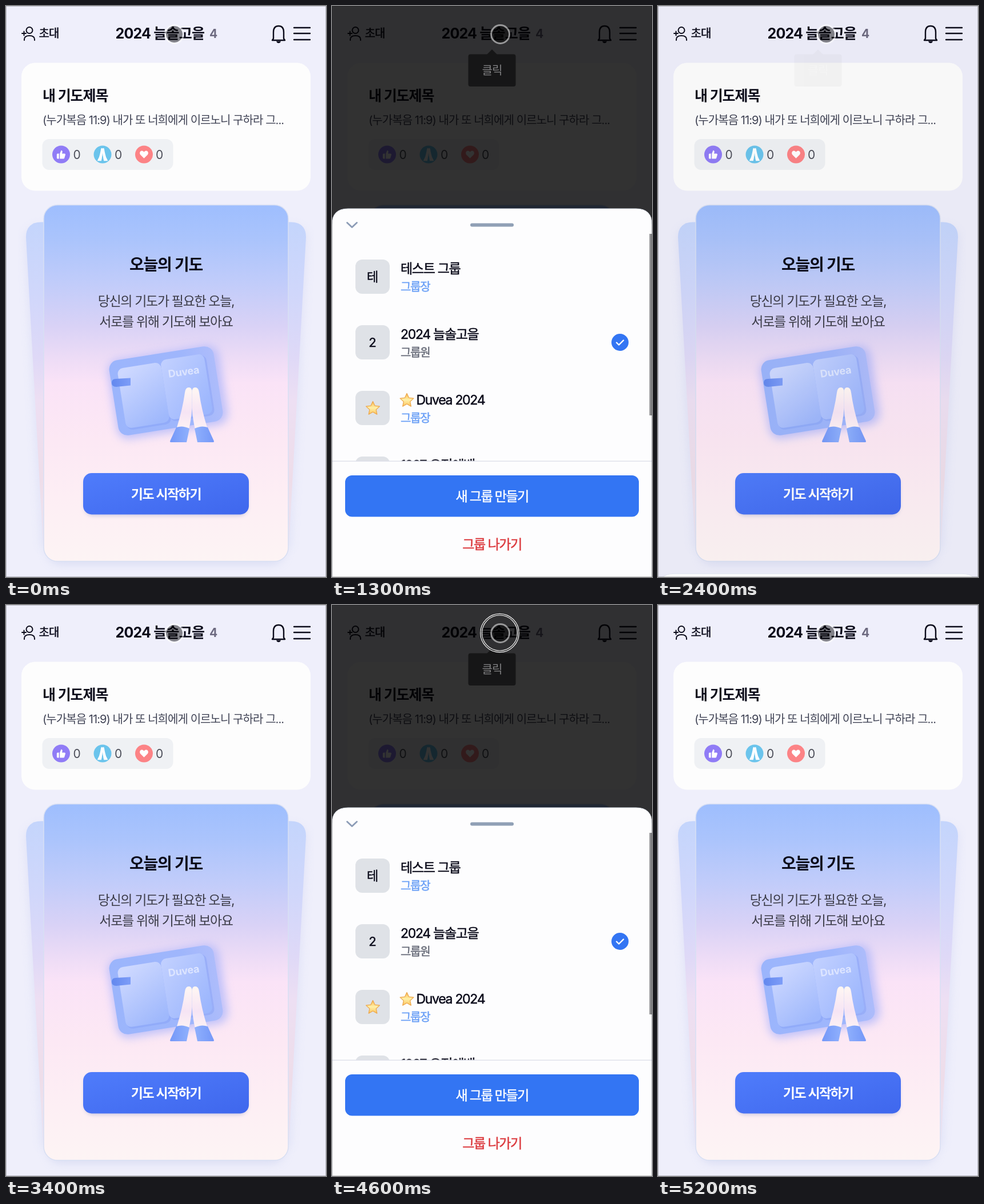
Recreate the animation shown at these times as an HTML page. Size 560 px wide and 1000 px high, loop 5.5 s.

```html
<!DOCTYPE html>
<html lang="ko">
<head>
<meta charset="utf-8">
<title>기도 그룹</title>
<style>
html, body { margin: 0; width: 100%; height: 100%; overflow: hidden; background: #efeffb; }
svg { display: block; width: 100vw; height: 100vh; }
text { font-family: Inter, 'Noto Sans CJK KR', 'Noto Sans CJK', sans-serif; white-space: pre; }
</style>
</head>
<body>
<svg id="stage" viewBox="0 0 560 1000" xmlns="http://www.w3.org/2000/svg"></svg>
<script>
const LOOP = 5500, STEP = 100;
const OPEN_Y = 355, TRAVEL = 645, SLIDE = 500;
const SHEETS = [[669, 2033], [3414, 4633]]; // opening and closing starts
const TAPS = [500, 2000, 3200, 4600];
const GROUP = '2024 늘솔고을', APP = 'Duvea';
const INK = '#0b0b1a', BLUE = '#3375f3';

// ---- drawing helpers ----
// Medium weight is regular with a hairline outline, so Hangul thickens too.
function text(x, y, size, weight, fill, gap, str, anchor = 'start', extra = '') {
  const face = weight === 500
    ? `font-weight="400" stroke="${fill}" stroke-width="${size * .022}"`
    : `font-weight="${weight}"`;
  return `<text x="${x}" y="${y}" font-size="${size}" ${face} fill="${fill}" letter-spacing="${gap}" text-anchor="${anchor}" ${extra}>${str}</text>`;
}
const rect = (x, y, w, h, r, fill, extra = '') =>
  `<rect x="${x}" y="${y}" width="${w}" height="${h}" rx="${r}" fill="${fill}" ${extra}/>`;
const disc = (x, y, r, fill, extra = '') =>
  `<circle cx="${x}" cy="${y}" r="${r}" fill="${fill}" ${extra}/>`;
const line = (d, color, width) =>
  `<path d="${d}" fill="none" stroke="${color}" stroke-width="${width}" stroke-linecap="round" stroke-linejoin="round"/>`;
const gradient = (id, stops, dir = 'x1="0" y1="0" x2="0" y2="1"') =>
  `<linearGradient id="${id}" ${dir}>${stops.map(([o, c]) => `<stop offset="${o}" stop-color="${c}"/>`).join('')}</linearGradient>`;
const blur = (id, size) =>
  `<filter id="${id}" x="-30%" y="-30%" width="160%" height="160%"><feGaussianBlur stdDeviation="${size}"/></filter>`;

function star(x, y, r) {
  const pts = Array.from({ length: 10 }, (_, i) => {
    const a = i * Math.PI / 5 - Math.PI / 2, k = i % 2 ? r * 0.48 : r;
    return (x + k * Math.cos(a)).toFixed(1) + ',' + (y + k * Math.sin(a)).toFixed(1);
  });
  return `<polygon points="${pts.join(' ')}" fill="url(#gold)" stroke="#eda84e" stroke-width="1.3" stroke-linejoin="round"/>`;
}

function hands(skin, cuff) {
  const half = `<path d="M313 677Q314 668 320 668Q325.500 668 325.500 676V704Q324 726 320 741L299 738Q309 706 313 677Z" fill="${skin}"/>
    <path d="M298 738Q309 734 321 740L316 764H289Q286 764 287.5 761Z" fill="${cuff}"/>`;
  return half + `<g transform="translate(651 0) scale(-1 1)">${half}</g>`;
}

const defs = `<defs>
  ${gradient('card', [[0, '#9ebefe'], [.1, '#abc4fc'], [.22, '#c1ccfa'], [.34, '#d9d2f6'], [.43, '#eddcf6'], [.5, '#fae3f7'], [.66, '#fce8f4'], [.82, '#fdeef4'], [1, '#fdf4f4']])}
  ${gradient('wing', [[0, '#c4d5fc'], [.22, '#d0d7fb'], [.42, '#dfd9f7'], [.55, '#eddff3'], [.8, '#eedde9'], [1, '#ebe5f4']])}
  ${gradient('button', [[0, '#4f7cfb'], [1, '#3f67ed']], 'x1="0" y1="0" x2="1" y2="1"')}
  ${gradient('cover', [[0, '#9bb5fc'], [.7, '#9fb6fc'], [1, '#adbcfb']], 'x1="0" y1="0" x2="1" y2="0"')}
  ${gradient('pageL', [[0, '#cdd8ff'], [1, '#9fb8fc']], 'x1=".3" y1="0" x2=".7" y2="1"')}
  ${gradient('pageR', [[0, '#c3d1ff'], [1, '#9cb6fd']], 'x1="0" y1="0" x2=".8" y2="1"')}
  ${gradient('tab', [[0, '#6388ee'], [1, '#7d9df8']], 'x1="0" y1="0" x2="1" y2="0"')}
  ${gradient('skin', [[0, '#fff7f3'], [.6, '#f6e4f4'], [1, '#fdf2f4']])}
  ${gradient('cuff', [[0, '#7598f8'], [1, '#8fb0fd']], 'x1="0" y1="0" x2="1" y2="0"')}
  ${gradient('gold', [[0, '#f9b94e'], [.5, '#fff0a8'], [1, '#fbc45c']])}
  ${blur('soft', 8)}${blur('tight', 3)}
  <clipPath id="list"><rect x="0" y="44" width="560" height="398"/></clipPath>
</defs>`;

// ---- page ----
function header() {
  return line('M28 48H35M31.500 44.500V51.500M32 60V58.500Q32 52 41 52Q50 52 50 58.500V60', INK, 2)
    + disc(41, 42.500, 5.500, 'none', `stroke="${INK}" stroke-width="2"`)
    + text(57.500, 55, 20, 500, INK, -.8, '초대')
    + text(191.500, 57, 25, 700, INK, -.8, GROUP)
    + text(356, 56, 21, 700, '#6d6a80', 0, '4')
    + line('M468 57V46Q468 35 477 35Q486 35 486 46V57L488 60H466Z', INK, 2.4)
    + `<path d="M473 61.500H481Q480 65 477 65T473 61.500Z" fill="${INK}"/>`
    + line('M504 38H532M504 48H532M504 59H532', INK, 2.4);
}

function reactions() {
  const thumb = 'M9 10L12 2.5Q15 2.500 15 5.880L14 10H19.830Q22.300 10.300 21.750 12.560L19.420 20.560Q18.900 22 17.500 22H9ZM2 12Q2 10 4 10H7V22H4Q2 22 2 20Z';
  const heart = 'M12 21L4 13C1 10 2 4 7 3.500C9.500 3.500 11 5 12 6.300C13 5 14.500 3.500 17 3.500C22 4 23 10 20 13Z';
  const icon = (x, d) => `<path d="${d}" fill="#fff" transform="translate(${x} 260) scale(.76) translate(-12 -12)"/>`;
  const zero = x => text(x, 267.500, 21, 400, '#4d4f5a', 0, '0');
  return rect(63.500, 233, 229, 54, 12, '#eff1f4')
    + disc(96.500, 260, 15.500, '#907cf6') + icon(96.500, thumb) + zero(117.500)
    + disc(169, 260, 15.500, '#6bc4ec')
    + `<g transform="translate(169 260) scale(.235) translate(-325.500 -716)">${hands('#fff', '#fff')}</g>` + zero(190)
    + disc(241.500, 260, 15.500, '#fc8386') + icon(241.500, heart) + zero(262);
}

function book() {
  return `<g transform="translate(280 674) rotate(-9)">
    ${rect(-95, -67, 196, 140, 20, '#a9b4fb', 'opacity=".75" filter="url(#soft)"')}
    ${rect(-92.500, -66.500, 185, 133, 16, 'url(#cover)')}</g>
    <g transform="translate(242 684) rotate(-9)">${rect(-38, -53, 78, 107, 10, '#7f9cf3', 'opacity=".4"')}</g>
    <g transform="translate(240 682) rotate(-9)">${rect(-38, -53, 77, 106, 10, 'url(#pageL)')}</g>
    <g transform="translate(318 669) rotate(-9)">${rect(-38, -53, 78, 107, 10, '#7f9cf3', 'opacity=".4"')}</g>
    <g transform="translate(316 667) rotate(-9)">${rect(-38.500, -53, 77, 106, 10, 'url(#pageR)')}</g>
    <path d="M192 653L218 651.500V664.500L193 667Q185 667 185 660T192 653Z" fill="url(#tab)"/>`
    + text(311, 647, 18, 700, '#dde5ff', -.3, APP, 'middle', 'transform="rotate(-8 311 641)"')
    + hands('url(#skin)', 'url(#cuff)');
}

function page() {
  const wing = '<path d="M70 378.500H61Q35 379 35 405L65 945H70Z" fill="url(#wing)"/>';
  const wingGlow = '<path d="M70 384H61Q33 386 33 410L62 950H70Z" fill="#cfd3f3" opacity=".45" filter="url(#soft)"/>';
  const side = wingGlow + wing;
  return rect(0, 0, 560, 1000, 0, '#efeffb') + header()
    + rect(27, 99.500, 506, 224, 24, '#fdfdfd')
    + text(64, 166, 25, 700, INK, -1.1, '내 기도제목')
    + text(64, 206.500, 20, 400, '#3f4254', -.95, '(누가복음 11:9) 내가 또 너희에게 이르노니 구하라 그...')
    + reactions()
    + side + `<g transform="translate(560 0) scale(-1 1)">${side}</g>`
    + rect(72, 880, 416, 98, 24, '#c5cbec', 'opacity=".5" filter="url(#soft)"')
    + rect(66, 348.500, 428, 624, 24, 'url(#card)', 'stroke="#d8dff3" stroke-width="1.5"')
    + text(280, 463, 28, 700, INK, -1.2, '오늘의 기도', 'middle')
    + text(280, 524.500, 23, 400, '#3c3c48', -1.35, '당신의 기도가 필요한 오늘,', 'middle')
    + text(280, 561, 23, 400, '#3c3c48', -1.35, '서로를 위해 기도해 보아요', 'middle')
    + book()
    + rect(137, 823, 286, 70, 15, '#8c95c8', 'opacity=".4" filter="url(#tight)"')
    + rect(135, 818, 290, 72.500, 15, 'url(#button)')
    + text(280, 862.500, 23, 600, '#fff', -1.5, '기도 시작하기', 'middle');
}

// ---- bottom sheet, placed from its own top edge ----
function row(i, mark, title, role, lead, x = 120) {
  const y = i * 115;
  return rect(41, 89 + y, 60, 60, 12, '#dfe2e7')
    + (mark === '*' ? star(71.500, 120 + y, 12.500) + star(131, 106 + y, 12.500)
      : text(71, 127 + y, 22, 500, INK, 0, mark, 'middle'))
    + text(x, (i > 2 ? 112 : 113) + y, 23, 500, INK, -1.3, title)
    + text(120, 144 + y, 20, 500, lead ? '#6a9ff6' : '#666a77', -1.3, role);
}

function sheet() {
  return `<path d="M0 660V28Q0 0 28 0H532Q560 0 560 28V660Z" fill="#fdfdfe" stroke="#dfe4ee"/>`
    + line('M26.500 24.500L35 32.500L43.500 24.500', '#8c9cb6', 2.8)
    + rect(242, 25.500, 76, 6, 3, '#90a0b6')
    + '<g clip-path="url(#list)">'
    + row(0, '테', '테스트 그룹', '그룹장', true)
    + row(1, '2', GROUP, '그룹원', false)
    + row(2, '*', APP + ' 2024', '그룹장', true, 147.500)
    + row(3, '1', '1207 오전예배', '그룹원', false)
    + disc(504, 234, 15, BLUE) + line('M498 234.500L502 238.500L510 230.500', '#fff', 2.4)
    + rect(555.500, 44, 5, 318, 0, '#8d8d8f') + '</g>'
    + rect(0, 441.500, 560, 1.3, 0, '#dddfe9')
    + rect(23, 467, 514, 72.500, 12, BLUE)
    + text(280, 511.500, 23, 500, '#fff', -1.6, '새 그룹 만들기', 'middle')
    + text(280, 595.500, 23, 500, '#dc3b3f', -1.5, '그룹 나가기', 'middle');
}

const tip = `<path d="M271 85L280 76L289 85Z" fill="#141415"/>`
  + rect(238.500, 84.500, 83, 56.500, 4, '#141415')
  + text(280, 120, 20, 400, '#88888a', -.8, '클릭', 'middle');

const cursor = disc(294.500, 49.500, 14.500, '#000', 'fill-opacity=".45"')
  + disc(294.500, 49.500, 16, 'none', 'stroke="#fff" stroke-opacity=".5" stroke-width="2.8"');

const ripple = disc(293.500, 49, 32.300, 'none', 'stroke="#222" stroke-opacity=".5" stroke-width="2"')
  + [33.700, 31].map(r => disc(293.500, 49, r, 'none', 'stroke="#fff" stroke-width="1.2"')).join('');

const stage = document.getElementById('stage');
stage.innerHTML = defs + page()
  + '<rect id="shade" width="560" height="1000"/>'
  + `<g id="tip">${tip}</g><g id="sheet">${sheet()}</g>${cursor}<g id="ripple">${ripple}</g>`
  + rect(.5, .5, 559, 999, 0, 'none', 'stroke="#000" stroke-opacity=".22"');
const part = Object.fromEntries(['shade', 'tip', 'sheet', 'ripple'].map(id => [id, document.getElementById(id)]));

// cubic-bezier(.32, .72, 0, 1)
function ease(x) {
  if (x <= 0) return 0;
  if (x >= 1) return 1;
  let lo = 0, hi = 1;
  for (let i = 0; i < 24; i++) {
    const s = (lo + hi) / 2;
    if (.96 * (1 - s) ** 2 * s + s ** 3 < x) lo = s; else hi = s;
  }
  return 2.16 * (1 - lo) ** 2 * lo + 3 * (1 - lo) * lo ** 2 + lo ** 3;
}

function render(ms) {
  const t = Math.floor((ms + 8) / STEP) * STEP % LOOP; // ten pictures a second
  const slid = SHEETS.reduce((sum, [a, b]) => sum + ease((t - a) / SLIDE) - ease((t - b) / SLIDE), 0);
  const open = Math.max(0, slid);
  part.shade.setAttribute('opacity', .8 * open ** .8);
  part.tip.setAttribute('opacity', .92 * Math.min(1, 3 * open));
  part.sheet.setAttribute('transform', `translate(0 ${OPEN_Y + TRAVEL * (1 - open)})`);
  part.sheet.setAttribute('visibility', open > .001 ? 'visible' : 'hidden');
  part.ripple.setAttribute('visibility', TAPS.includes(t) ? 'visible' : 'hidden');
}

const start = performance.now();
function tick() {
  render(performance.now() - start);
  requestAnimationFrame(tick);
}
tick();
</script>
</body>
</html>
```
